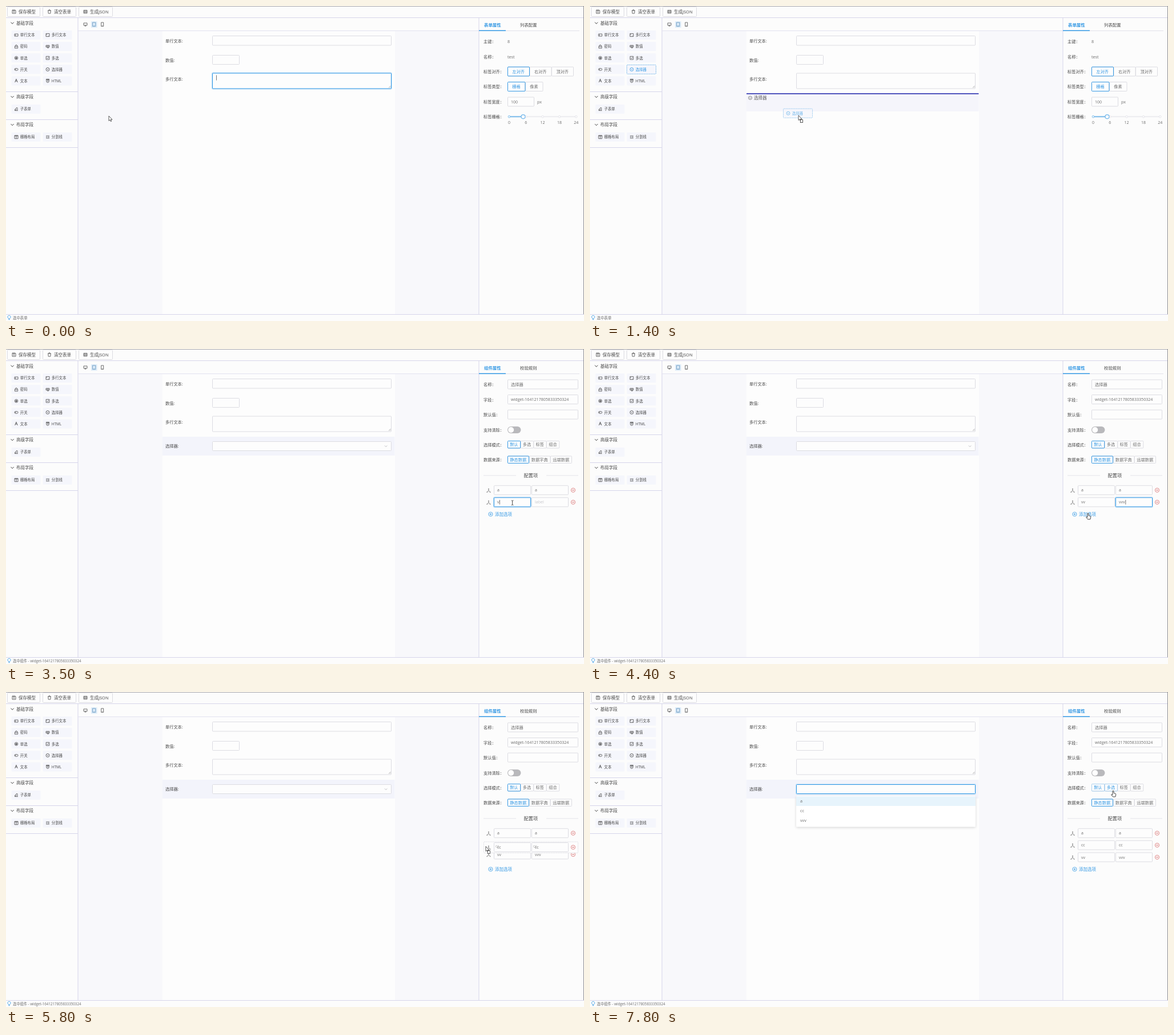
Recreate the animation shown at these times as an HTML page. Size 1012x553 px, loop 8000 ms.

```html
<!DOCTYPE html>
<html lang="zh-CN">
<head>
<meta charset="utf-8">
<title>Form designer</title>
<style>
html, body { margin: 0; width: 100%; height: 100%; overflow: hidden; background: #fcfcfd; }
svg { display: block; width: 100%; height: 100%; }
text { font-family: "Open Sans", "Noto Sans CJK SC", "Noto Sans CJK", sans-serif; white-space: pre; }
</style>
</head>
<body>
<svg viewBox="0 0 1012 553" xmlns="http://www.w3.org/2000/svg">
<defs><filter id="shade" x="-5%" y="-20%" width="110%" height="150%">
<feDropShadow dx="0" dy="1.5" stdDeviation="2" flood-color="#000" flood-opacity=".16"/></filter></defs>
<g id="base"></g><g id="live"></g>
</svg>
<script>
const LOOP = 8000;
const BLUE = '#3398e4', INK = '#484848', SOFT = '#6c6c6c', EDGE = '#dcdce2', RULE = '#d6d5ea';

const rect = (x, y, w, h, fill, stroke = 'none', more = '') =>
  `<rect x="${x}" y="${y}" width="${w}" height="${h}" fill="${fill}" stroke="${stroke}" ${more}/>`;
const box = (x, y, r, b, stroke = EDGE, fill = '#fdfdfd', more = '') =>
  rect(x + .5, y + .5, r - x - 1, b - y - 1, fill, stroke, 'rx="1" ' + more);
const path = (d, stroke = INK, width = .8, fill = 'none', more = '') =>
  `<path d="${d}" fill="${fill}" stroke="${stroke}" stroke-width="${width}" ${more}/>`;
const line = (x1, y1, x2, y2, stroke = RULE, width = 1, more = '') =>
  path(`M${x1} ${y1}L${x2} ${y2}`, stroke, width, 'none', more);
const text = (x, y, s, size = 7.2, fill = INK, more = '') =>
  `<text x="${x}" y="${y + size * .37}" font-size="${size}" fill="${fill}" ${more}>${s}</text>`;
const mid = 'text-anchor="middle"';
const at = (x, y, inner, more = '') => `<g transform="translate(${x} ${y})" ${more}>${inner}</g>`;
const circle = (r, stroke, width = .8, fill = 'none') =>
  `<circle r="${r}" fill="${fill}" stroke="${stroke}" stroke-width="${width}"/>`;

// Icons are drawn around their own centre
const ICONS = {
  input: 'M-3 -2H3V2H-3ZM-1.5 -1V1',
  area: 'M-3 -2.6H3V2.6H-3ZM-1.7 -1.5V0M1 1.5L2 .5',
  lock: 'M-2.6 -.4H2.6V3H-2.6ZM-1.6 -.4V-2Q0 -4 1.6 -2V-.4M0 .8V1.8',
  num: 'M-3 -2H3V1H-3ZM-1 -2V1M1 -2V1M-1 2.4H2',
  check: 'M-2.8 -2.8H2.8V2.8H-2.8ZM-1.5 0L-.3 1.2L1.8 -1.4',
  toggle: 'M-1.2 -1.8H1.2A1.8 1.8 0 0 1 1.2 1.8H-1.2A1.8 1.8 0 0 1 -1.2 -1.8M-1.9 0H-.3M-1.9 -.6V.6',
  select: 'M-3 0A3 3 0 0 1 3 0A3 3 0 0 1 -3 0M-1.4 -.5L0 .8L1.4 -.5',
  html: 'M-2.6 -3H2.6L2 2L0 3L-2 2ZM-1 -1.4H1.5M-1 .4H1M-2 -2.2H2',
  sub: 'M-3 2.6H3M-2.6 1.5L-2 0L1 -3L2.4 -1.6L-.8 1.2ZM1 1.5L3 0',
  grid: 'M-3 -2.8H3V2.8H-3ZM0 -2.8V2.8M-3 -2H3',
  split: 'M-3 -2H3M-3 0H-1M0 0H3M-3 2H3',
  save: 'M-3 -3H2L3 -2V3H-3ZM-1.4 -3V-1.2H1.2V-3M-1.4 1H1.4',
  trash: 'M-3 -2H3M-1 -2V-3.2H1V-2M-2.2 -2L-1.9 3H1.9L2.2 -2',
  json: 'M-3 -2.6H3V2.6H-3ZM-3 0H3M-1.6 -1.3H0M1 -1.3H2M-1.6 1.3H0M1 1.3H2',
  desktop: 'M-3 -2.4H3V1.6H-3ZM-1.4 2.8H1.4M0 1.6V2.8',
  tablet: 'M-2.6 -3.4H2.6V3.4H-2.6ZM-.5 2.3H.5',
  phone: 'M-2 -3.4H2V3.4H-2ZM-.5 2.3H.5',
  tree: 'M0 -3V0L-3 2.6M0 0L3 2.6M-1 -3H1M-3.6 2.8H-1.8M1.8 2.8H3.6'
};
const icon = (name, x, y, color = INK, width = .8) => at(x, y, path(ICONS[name], color, width));

function chip(x, y, kind, label, hot) {
  const c = hot ? BLUE : INK;
  let mark = kind === 'A' ? text(x, y, 'A', 8, c, mid + ' font-weight="600"') :
    kind === 'radio' ? at(x, y, circle(2.8, c) + circle(1.5, 'none', 0, c)) : icon(kind, x, y, c);
  return box(x - 9, y - 8.5, x + 43, y + 8.5, hot ? '#79b8ea' : 'none', '#f5f6fc', hot ? 'stroke-dasharray="2 1"' : '') +
    mark + text(x + 6.8, y, label, 6.4, c);
}

function field(x, y, r, b, glow = 0) {
  return box(x, y, r, b) + (glow ? `<g opacity="${glow}">` +
    box(x - .5, y - .5, r + .5, b + .5, '#c5e2f8', 'none', 'stroke-width="2"') + box(x, y, r, b, BLUE) + '</g>' : '');
}

function buttons(x, y, h, w, labels, picked = [0], edge = BLUE) {
  const cells = labels.map((s, i) => box(x + i * w, y, x + (i + 1) * w + .5, y + h) +
    text(x + (i + .5) * w, y + h / 2, s, 7.2, picked.includes(i) ? BLUE : SOFT, mid)).join('');
  return cells + picked.map(i => box(x + i * w, y, x + (i + 1) * w + .5, y + h, edge, 'none')).join('');
}

const label = (y, s) => text(836, y, s + '：', 7.2);

function drawBase() {
  let s = rect(0, 0, 1012, 553, '#fcfcfc') + rect(126, 44, 148, 497, '#f8f8fb') + rect(681, 44, 147, 497, '#f8f8fb') +
    rect(274, 44, 407, 497, '#fdfdfd');
  [['save', '保存模型', 2, 60], ['trash', '清空表单', 64, 123], ['json', '生成JSON', 127, 187]].forEach(([k, t, x, r]) => {
    s += box(x, 1, r, 19) + icon(k, x + 12, 10) + text(x + 20, 10, t, 7.5);
  });
  s += line(0, 20.5, 1012, 20.5, RULE) + line(0, .5, 1012, .5, '#a9a9ae') + line(1011.5, 0, 1011.5, 541, '#8e8e94') +
    line(126, 20, 126, 541) + line(828, 20, 828, 541) + line(126, 43.5, 828, 43.5, '#e2e1ef') + line(0, 541.5, 1012, 541.5);
  [[30, '基础字段', 150], [159.5, '高级字段', 199], [208.5, '布局字段', 248]].forEach(([y, t, end]) => {
    s += path(`M8.5 ${y - 1.5}l2.6 2.8l2.6 -2.8`, INK, 1) + text(18, y, t, 7.5) + line(0, end + .5, 126, end + .5);
  });
  [['input', '单行文本', 'area', '多行文本'], ['lock', '密码', 'num', '数值'], ['radio', '单选', 'check', '多选'],
   ['toggle', '开关', 'select', '选择器'], ['A', '文本', 'html', 'HTML']].forEach(([a, t, b, u], i) => {
    const y = 51 + i * 20.1;
    s += chip(18, y, a, t) + chip(73, y, b, u);
  });
  s += chip(18, 181, 'sub', '子表单') + chip(18, 230, 'grid', '栅格布局') + chip(73, 230, 'split', '分割线');
  s += icon('desktop', 139, 32.3) + rect(149, 27, 10.5, 11, '#dcebf8') + icon('tablet', 154.2, 32.3, '#5b8db8') + icon('phone', 168.7, 32.3);
  s += text(279, 61, '单行文本:') + field(361, 52, 675, 69.5) + text(279, 95, '数值:') + field(361, 86, 409, 103) + text(279, 128.5, '多行文本:');
  s += at(5.5, 547, path('M-1 2.2V1.3A2.6 2.6 0 1 1 1 1.3V2.2ZM-.9 3.6H.9', BLUE, .9));
  document.getElementById('base').innerHTML = s;
}

function tabs(a, b) {
  return text(837, 33, a, 7.4, BLUE, 'font-weight="600"') + text(900, 33, b, 7.4) +
    line(828, 43.5, 1004, 43.5, '#e2e1ea') + line(828, 43.2, 875, 43.2, BLUE, 1.5);
}

function formPanel() {
  let s = tabs('表单属性', '列表配置') + label(62, '主键') + text(878, 62, '8', 7.2, SOFT) + label(89, '名称') + text(878, 89, 'test', 7.2, SOFT) +
    label(115, '标签对齐') + buttons(878, 106.5, 17, 38.5, ['左对齐', '右对齐', '顶对齐']) +
    label(141, '标签类型') + buttons(878, 133, 17, 31, ['栅格', '像素']) +
    label(168, '标签宽度') + field(878, 159.5, 925, 176.5) + text(884, 168, '100', 7, SOFT) + text(930, 168, 'px', 7.2, SOFT) +
    label(194, '标签栅格') + line(881, 194.3, 998, 194.3, '#ececf0', 2) + line(881, 194.3, 905, 194.3, '#7dbdec', 2);
  for (let i = 0; i < 5; i++) {
    const x = 881 + i * 29.3;
    s += at(x, 194.3, circle(1.8, i ? '#e4e4ea' : '#7dbdec', 1, '#fff')) + text(x, 204, i * 6, 7, SOFT, mid);
  }
  return s + at(905.5, 194.3, circle(3.5, '#6db4ea', 1.2, '#fff'));
}

// When each character lands in an option's value and label
const OPTIONS = [
  { from: 0, cells: [['a', [2300]], ['a', [2700]]] },
  { from: 3100, cells: [['vv', [3500, 3600]], ['vvv', [3900, 4100, 4200]]] },
  { from: 4500, cells: [['cc', [4800, 5000]], ['cc', [5300, 5400]]] }
];
// Focus moves: time, row, column
const FOCUS = [[2150, 0, 0], [2380, 0, 1], [3000, -1, 0], [3250, 1, 0], [3750, 1, 1], [4480, -1, 0], [4650, 2, 0], [5100, 2, 1], [5500, -1, 0]];

function glowOf(t, row, col) {
  const i = FOCUS.findLastIndex(f => f[0] <= t);
  if (i < 0) return 0;
  const same = f => f && f[1] === row && f[2] === col, k = Math.min(1, (t - FOCUS[i][0]) / 240);
  return same(FOCUS[i]) ? k : same(FOCUS[i - 1]) ? 1 - k : 0;
}

function option(t, n, y, ghost) {
  const cells = OPTIONS[n].cells.map(([word, times], c) => {
    const x = c ? 920 : 854, typed = word.slice(0, times.filter(k => k <= t).length), glow = glowOf(t, n, c);
    const hint = c ? 'label' : 'value';
    return field(x, y - 8.5, x + 65, y + 8.5, glow) +
      (ghost ? text(x + 3, y - 2, typed, 7, '#aaa') : '') +
      text(x + 6, y, typed || hint, 7, typed ? SOFT : '#c6c6ca') +
      (glow >= .5 ? line(x + 6.7 + typed.length * 3.7, y - 4, x + 6.7 + typed.length * 3.7, y + 4, '#555', .8) : '');
  }).join('');
  const frame = ghost ? box(836, y - 10, 1002, y + 10.5, '#dfdfe4', '#fdfdfd', 'stroke-dasharray="2 1"') : '';
  return frame + icon('tree', 845, y + .8, '#777', .9) + cells + at(993, y, circle(3.6, '#d96a6a') + line(-1.8, 0, 1.8, 0, '#d05050', .9));
}

const rowY = i => 247.8 + 21.1 * i;
const ease = k => (k = Math.max(0, Math.min(1, k)), k * k * (3 - 2 * k));

function widgetPanel(t, cursorY) {
  const name = 'widget-1641217805833350324', multi = t >= 7700;
  let s = tabs('组件属性', '校验规则') + label(62, '名称') + field(878, 53.5, 1002, 70.5) + text(884, 62, '选择器', 7.2, SOFT) +
    label(89, '字段') + field(878, 80, 1002, 97) + text(884, 88.7, name, 7.1, SOFT) +
    label(115, '默认值') + field(878, 106.5, 1002, 123.5) +
    label(142, '支持清除') + rect(878, 136, 23.5, 12, '#b9b9bc', 'none', 'rx="6"') + at(884.2, 142, circle(5, 'none', 0, '#fff')) +
    label(168, '选择模式') + buttons(878, 161, 13.5, 22.7, ['默认', '多选', '标签', '组合'], multi ? [0, 1] : [0], multi ? '#a9d1f1' : BLUE) +
    label(194, '数据来源') + buttons(878, 187.5, 13.5, 37.5, ['静态数据', '数据字典', '远端数据']) +
    line(836, 222, 893, 222, '#e4e4e9') + line(946, 222, 1002, 222, '#e4e4e9') + text(918.8, 222, '配置项', 8.2, INK, mid);
  const count = OPTIONS.filter(o => o.from <= t).length;
  for (let i = 0; i < Math.min(count, 2); i++)
    s += option(t, i, rowY(i === 1 ? 1 + ease((t - 5600) / 290) : i));
  if (count > 2) {
    const held = t >= 5600 && t < 6000;
    s += option(t, 2, held ? Math.min(rowY(2), cursorY + 1.5) : rowY(t < 5600 ? 2 : 1), held);
  }
  const y = rowY(count);
  s += at(848.5, y, circle(3.6, BLUE) + path('M-1.9 0H1.9M0 -1.9V1.9', BLUE)) + text(856, y, '添加选项', 7.5, BLUE);
  return s + text(12, 548, '选中组件 - ' + name, 6.25, SOFT);
}

function selectRow(t) {
  const open = t >= 6850;
  let s = rect(274, 154, 406.5, 33, '#f3f4fb') + text(279, 170.5, '选择器:') + field(361, 162, 675, 179, open ? 1 : 0);
  if (t < 7700) s += path(open ? 'M663 171.5l2.2 -2.2l2.2 2.2' : 'M663 169.5l2.2 2.2l2.2 -2.2', '#b5b5ba', .9);
  if (open) {
    s += rect(361, 182.5, 314, 54, '#fff', 'none', 'rx="1.5" filter="url(#shade)"') + rect(361, 183.5, 314, 16.5, '#e7f4fc');
    ['a', 'cc', 'vvv'].forEach((w, i) => s += text(368, 191.8 + i * 17, w, 7.2, SOFT));
  }
  return s;
}

const TRACK = [[0, 180, 193], [200, 172, 182], [800, 92, 112], [1100, 92, 112], [1400, 365, 192], [1700, 440, 172], [2200, 878, 249],
  [2400, 930, 253], [2500, 951, 255], [2700, 951, 255], [3000, 872, 271], [3100, 872, 271], [3300, 884, 270], [3600, 888, 270],
  [3800, 945, 270], [4100, 945, 271], [4400, 872, 288], [4500, 872, 288], [4700, 885, 291], [5000, 890, 291], [5100, 945, 291],
  [5400, 940, 291], [5600, 841, 290], [5800, 840, 271], [6000, 840, 270], [6100, 835, 268], [6700, 500, 176], [6900, 498, 176],
  [7200, 520, 190], [7700, 912, 173], [7800, 916, 173]];
const KINDS = [[0, 'arrow'], [700, 'hand'], [1100, 'drag'], [1700, 'arrow'], [2200, 'beam'], [2900, 'hand'], [3250, 'beam'],
  [4350, 'hand'], [4650, 'beam'], [5500, 'arrow'], [5600, 'drag'], [6000, 'arrow'], [6600, 'hand'], [7200, 'arrow'], [7600, 'hand']];

function cursorAt(t) {
  const i = TRACK.findLastIndex(k => k[0] <= t), a = TRACK[i], b = TRACK[i + 1] || a;
  const k = b === a ? 0 : (t - a[0]) / (b[0] - a[0]);
  return [a[1] + (b[1] - a[1]) * k, a[2] + (b[2] - a[2]) * k];
}

function cursor(kind, x, y) {
  const arrow = path('M0 0V8.6L2 6.8L3.4 9.8L4.7 9.2L3.4 6.3H6Z', '#333', .8, '#fff');
  const shapes = {
    arrow,
    drag: arrow + rect(3.3, 7.6, 4.2, 5, '#fff', '#333', 'stroke-width=".8"'),
    hand: path('M-1 6V1Q0 -.5 1 1V4.5L4.2 5.4Q5 6 4.6 8L3.8 11H-.4L-3.4 7.4Q-3.4 5.8 -1 7.6Z', '#333', .9, '#fff'),
    beam: path('M-1.8 -4H-.6L0 -3.4L.6 -4H1.8M0 -3.4V3.4M-1.8 4H-.6L0 3.4L.6 4H1.8', '#333', .9)
  };
  return at(x, y, shapes[kind]);
}

function draw(t) {
  const [x, y] = cursorAt(t), added = t >= 1700, dragging = t >= 1100 && t < 1700;
  let s = field(361, 117.5, 675, 145.5, t < 1100 ? 1 : 0) + path('M670 143.5l3.5 -3.5M672 143.5l1.5 -1.5', '#999', .7);
  if (t < 1100) s += line(368.5, 121.5, 368.5, 130.5, '#666', .9);
  if (t >= 700 && t < 1700) s += chip(73, 111.3, 'select', '选择器', true);
  if (added) s += selectRow(t) + widgetPanel(t, y);
  else s += formPanel() + text(12, 548, '选中表单', 6.4, SOFT);
  if (dragging) {
    if (t >= 1300) s += rect(274, 154, 406.5, 31, '#f5f5fb') + rect(274, 153, 406.5, 2, '#5054bd') +
      icon('select', 280.5, 161.3, '#666') + text(287, 161.3, '选择器', 7.5, '#555');
    s += at(x - 27, y - 12.5 + 8.8, chip(9, 0, 'select', '选择器', true), 'opacity=".7"');
  }
  s += cursor(KINDS.findLast(k => k[0] <= t)[1], x, y);
  document.getElementById('live').innerHTML = s;
}

const STEPS = ('0 2 3 5 6 8 9 11 13 14 16 17 19 20 22 24 25 27 28 30 31 33 35 36 38 39 41 42 44 45 ' +
  '47 48 50 51 53 54 56 58 60 61 63 64 66 67 69 71 72 74 75 77 78').split(' ').map(n => n * 100);
let shown = -1;

function tick() {
  const now = performance.now() % LOOP, t = STEPS.findLast(k => k <= now);
  if (t !== shown) draw(shown = t);
  requestAnimationFrame(tick);
}

drawBase();
tick();
</script>
</body>
</html>
```
